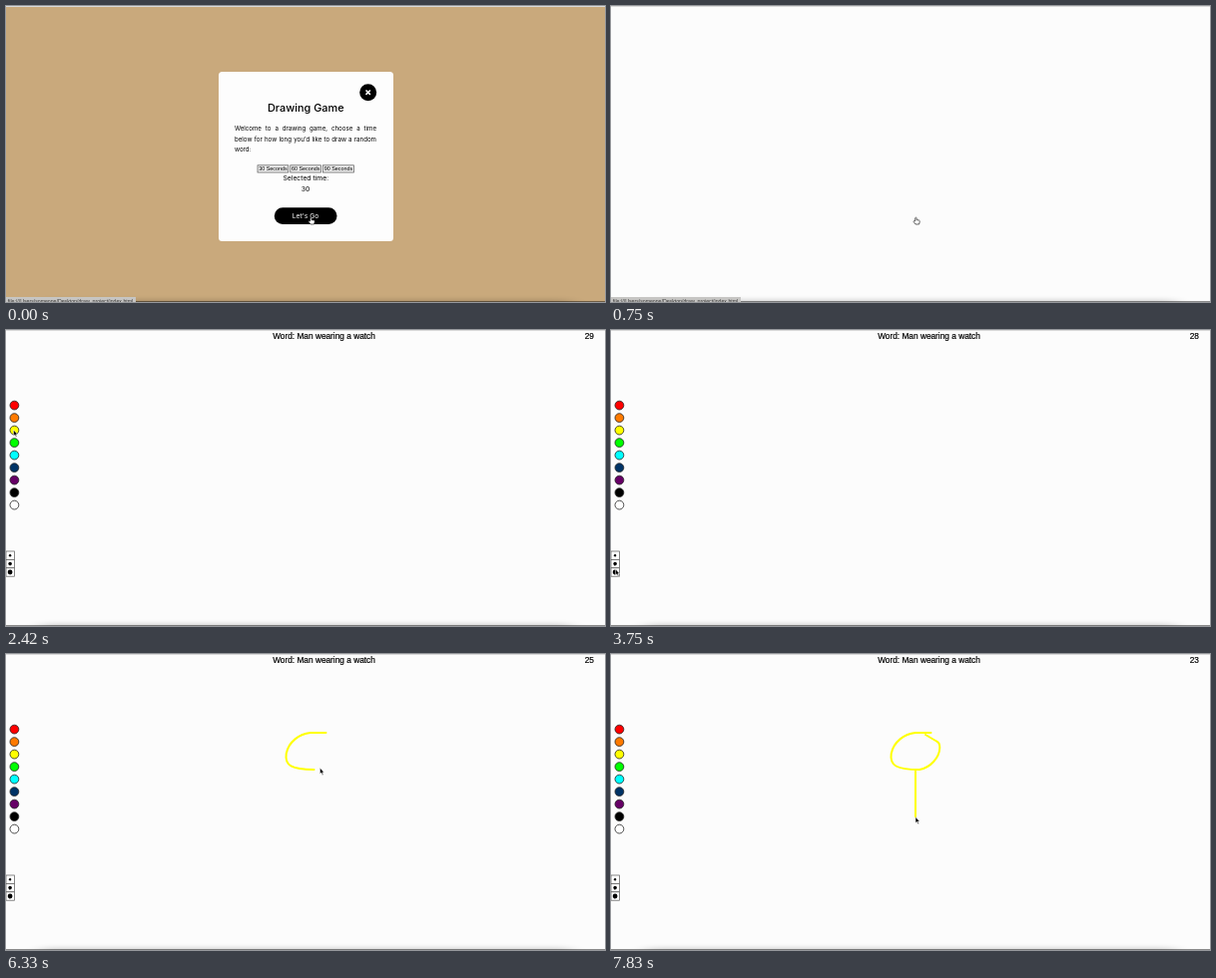
These frames come from a looping animation (600 by 297 pixels, 8000 ms). An HTML page:

```html
<!DOCTYPE html>
<html lang="en">
<head>
<meta charset="utf-8">
<title>Drawing Game</title>
<style>
  html, body { margin: 0; width: 100%; height: 100%; overflow: hidden; background: #fcfcfc; }
  svg { display: block; width: 600px; height: 297px; }
  text { font-family: "Liberation Sans", Arial, sans-serif; text-anchor: middle; }
  #board text { font-size: 8.3px; stroke: #000; stroke-width: .2; }
  #modal .ui { font-family: Inter, sans-serif; font-size: 6.8px; }
  #modal .title { font-size: 10.9px; font-weight: 450; }
  .intro { font: 6.15px/10.4px Inter, sans-serif; color: #000; }
  .intro div { white-space: nowrap; text-align: justify; text-align-last: justify; }
  .intro div:last-child { text-align-last: left; }
  .ink { fill: none; stroke: #ff0; stroke-width: 2; stroke-linecap: round; stroke-linejoin: round; }
</style>
</head>
<body>
<svg viewBox="0 0 600 297" xmlns="http://www.w3.org/2000/svg">
  <defs>
    <filter id="soft" x="-10%" y="-300%" width="120%" height="700%"><feGaussianBlur stdDeviation="9 2.5"/></filter>
  </defs>
  <rect width="600" height="297" fill="#fcfcfc"/>

  <g id="board">
    <g id="palette" stroke="#222" stroke-width=".8"></g>
    <g id="brushes"></g>
    <text x="318.5" y="9">Word: Man wearing a watch</text>
    <text id="timer" x="584.3" y="9">30</text>
    <path id="head" class="ink" d="M320.5 79H305C294 80 283 88 280.7 100C279 112 286 116 309 116C320 114 329 104 329.3 94Q329.5 89 326 87.5L315 81"/>
    <path id="body" class="ink" d="M305 116.5V163.500"/>
  </g>

  <g id="modal">
    <rect width="600" height="297" fill="#c9a97c"/>
    <rect x="213" y="66" width="175" height="170" rx="3.5" fill="#fdfdfd"/>
    <circle cx="362.7" cy="86.7" r="8.5"/>
    <path d="M360.5 84.5l4.4 4.400m0-4.400l-4.4 4.400" stroke="#fff" stroke-width="1.5"/>
    <text class="ui title" x="300.3" y="106">Drawing Game</text>
    <foreignObject x="229" y="118.300" width="142" height="34">
      <div class="intro" xmlns="http://www.w3.org/1999/xhtml">
        <div>Welcome to a drawing game, choose a time</div>
        <div>below for how long you'd like to draw a random</div>
        <div>word:</div>
      </div>
    </foreignObject>
    <g id="choices"></g>
    <text class="ui" x="300.3" y="175.300">Selected time:</text>
    <text class="ui" x="300" y="185.500">30</text>
    <rect x="268.8" y="202.300" width="62.700" height="16.700" rx="8.3"/>
    <text class="ui" x="300" y="213" fill="#fff">Let's Go</text>
  </g>

  <rect x="35" y="295" width="530" height="5" opacity=".18" filter="url(#soft)"/>
  <rect width="600" height="1" fill="#dadada"/>
  <rect y="296" width="600" height="1" opacity=".45"/>
  <g id="status">
    <rect y="292" width="130" height="5" fill="#c6c5c3"/>
    <text x="64.5" y="298" font-size="5.2" fill="#333">file:///Users/someone/Desktop/draw_project/index.html</text>
  </g>

  <g id="pointer">
    <path id="arrow" d="M0 0V6L1.4 4.800L2.4 7.100L3.4 6.700L2.4 4.500H4.200Z" stroke="#fff" stroke-width=".5"/>
    <path id="hand" d="M-1.300 1.200Q-.5 .2 .2 1.200V3.200L2.600 3.500Q3.400 3.800 3.200 5L2.600 7.500H-1L-3 4.700Q-2.600 3.500-1.300 4.400Z" fill="#fff" stroke="#222" stroke-width=".7"/>
  </g>
</svg>
<script>
const LOOP = 8000, STEP = 1000 / 12;
const START = 740, BOARD = 830, RELEASE = 910;
const INK_DELAY = 50;
const $ = id => document.getElementById(id);

function add(parent, tag, attrs, text = '') {
  const node = document.createElementNS('http://www.w3.org/2000/svg', tag);
  for (const key in attrs) node.setAttribute(key, attrs[key]);
  node.textContent = text;
  $(parent).appendChild(node);
}

['#f00', '#ff7a00', '#ff0', '#0f0', '#0ff', '#036', '#606', '#000', '#fff'].forEach((fill, i) =>
  add('palette', 'circle', { cx: 8.4, cy: 75.6 + 12.5 * i, r: 4.4, fill }));

for (let i = 0; i < 3; i++) {
  const y = 222 + 8.4 * i;
  add('brushes', 'rect', { x: 0, y, width: 8.4, height: 8.4, fill: '#fff', stroke: '#555', 'stroke-width': .7 });
  add('brushes', 'circle', { cx: 4.1, cy: y + 4.2, r: 1.2 + .6 * i });

  const x = 252 + 32.8 * i;
  add('choices', 'rect', { x, y: 159.8, width: 30.8, height: 7.2, fill: '#ededed', stroke: '#555', 'stroke-width': .7 });
  add('choices', 'text', { x: x + 15.4, y: 165.3, 'font-size': 5.4 }, `${30 * (i + 1)} Seconds`);
}

const move = (from, to, x, y) => ({ from, to, x, y });
const draw = (from, to, id) => ({ from, to, path: $(id) });

// What the pointer does, in order; it rests between actions.
const actions = [
  move(0, 0, 306, 211.5),
  move(910, 1250, 234, 137),
  move(1335, 1500, 5, 86),
  move(1670, 1920, 8, 125),
  move(1920, 2420, 7.5, 100),
  move(2750, 3580, 4.5, 240),
  move(4170, 4420, 176, 188),
  move(4500, 5170, 261, 136.5),
  move(5250, 5580, 320, 79),
  draw(5600, 6700, 'head'),
  move(6920, 7300, 304.5, 115.5),
  draw(7320, 7780, 'body')
];

const show = (id, on) => $(id).setAttribute('display', on ? 'inline' : 'none');
const progress = ({ from, to }, t) => t >= to ? 1 : Math.max(0, (t - from) / (to - from));

function pointerAt(t) {
  let x = 0, y = 0;
  for (const action of actions.filter(a => t >= a.from)) {
    const p = progress(action, t);
    if (action.path) {
      ({ x, y } = action.path.getPointAtLength(p * action.path.getTotalLength()));
    } else {
      x += (action.x - x) * p;
      y += (action.y - y) * p;
    }
  }
  return [x, y];
}

function ink(action, t) {
  const length = action.path.getTotalLength();
  const part = progress(action, t - INK_DELAY);
  show(action.path.id, part > 0);
  action.path.setAttribute('stroke-dasharray', `${length * part} ${length + 9}`);
}

function render(time) {
  const t = Math.floor((time % LOOP + 5) / STEP) * STEP;
  show('modal', t < START);
  show('board', t >= BOARD);
  show('status', t < RELEASE);
  show('hand', t < RELEASE);
  show('arrow', t >= RELEASE);
  $('timer').textContent = 30 - Math.max(0, Math.floor((t - BOARD) / 1000));
  $('pointer').setAttribute('transform', `translate(${pointerAt(t)})`);
  actions.filter(a => a.path).forEach(a => ink(a, t));
}

const begin = performance.now();
function tick() {
  render(performance.now() - begin);
  requestAnimationFrame(tick);
}
tick();
</script>
</body>
</html>
```
